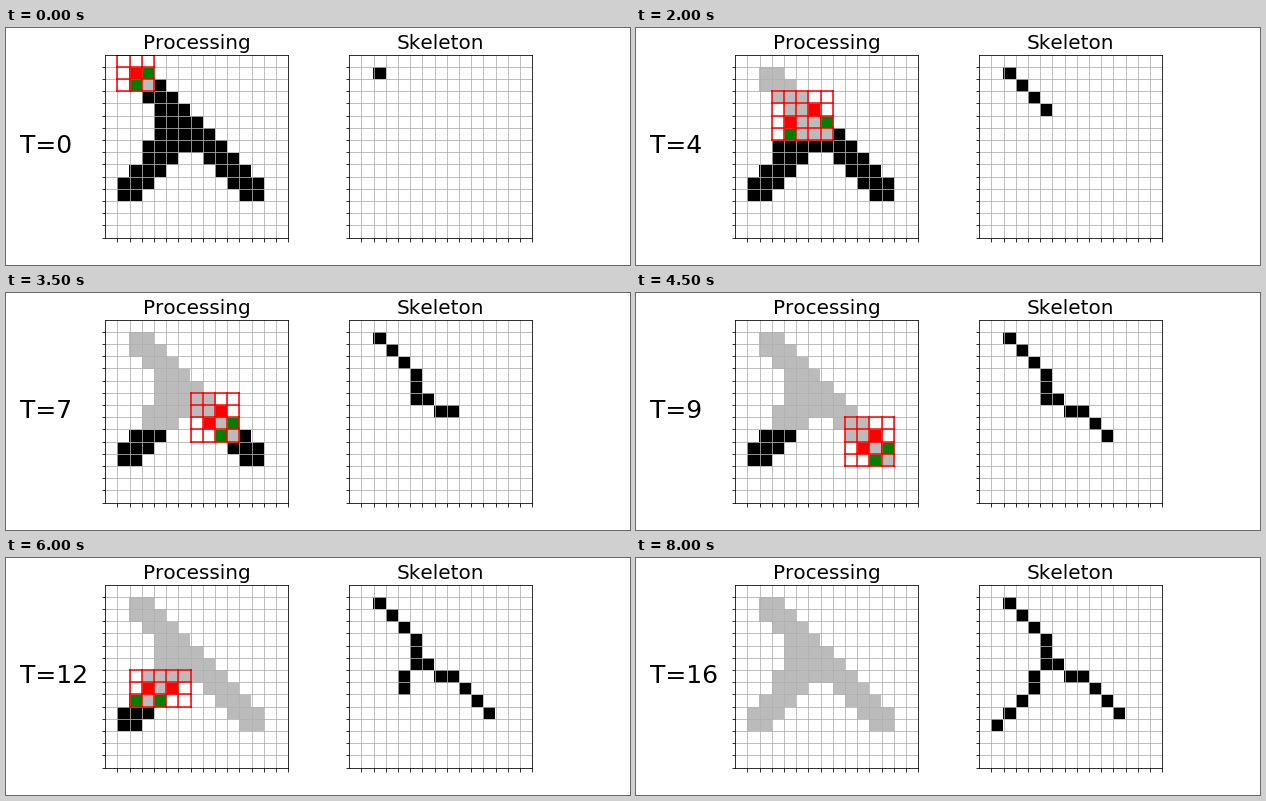
A matplotlib script that plays this animation: 624x237 px, repeating every 8.5 s.

```python
import numpy as np
import matplotlib.pyplot as plt
from matplotlib.animation import FuncAnimation
from matplotlib.colors import ListedColormap

W, H, DPI = 624, 237, 72
N, CELL = 15, 12.2
STEPS = 17
SPLIT, LAST = 7, 11   # last row above the split, last filled row
FORK = SPLIT - 1      # step at which the shape splits in two
RESUME = LAST + 1     # step at which the stored branch is picked up

WHITE, BLACK, GRAY, RED, GREEN, BLUE = range(6)
CMAP = ListedColormap(["white", "black", "#bbbbbb", "red", "green", "blue"])

plt.rcParams["text.kerning_factor"] = 6


def main_row(r):
    """First and last column of the trunk and the right arm."""
    first = r if r > SPLIT else min(max(2, r), 4, 10 - r)
    return first, min(r + 2, 12)


def branch_row(r):
    """First and last column of the left arm."""
    return max(1, 11 - r), 13 - r


def front(step):
    """Contour cells (column, row) visited at a step."""
    if step == 0:
        return [(main_row(1)[0], 1)]
    if step < LAST:
        return [(main_row(step)[1], step), (main_row(step + 1)[0], step + 1)]
    row = step - RESUME + SPLIT + 1
    if SPLIT < row <= LAST:
        return [(c, row) for c in branch_row(row)]
    return []


def window(cells):
    """Bounding box of the 3x3 neighbourhoods: c0, c1, r0, r1."""
    cols, rows = zip(*cells)
    return min(cols) - 1, max(cols) + 2, min(rows) - 1, max(rows) + 2


def paint(grid, cells, value):
    for c, r in cells:
        grid[r, c] = value


def processing(step):
    grid = np.full((N, N), WHITE)
    for r in range(1, LAST + 1):
        spans = [main_row(r)] + ([branch_row(r)] if r > SPLIT else [])
        for a, b in spans:
            grid[r, a:b + 1] = BLACK
    for t in range(step + 1):
        if front(t):
            c0, c1, r0, r1 = window(front(t))
            part = grid[r0:r1, c0:c1]
            part[part != WHITE] = GRAY
    if front(step):
        paint(grid, front(step), RED)
        paint(grid, front(step + 1), GREEN)
    if step == FORK:
        paint(grid, front(RESUME), BLUE)
    return grid


def middle(step):
    return np.mean(front(step), axis=0).astype(int)


def skeleton(step):
    """Midpoints of the visited fronts, joined by straight runs of cells."""
    grid = np.full((N, N), WHITE)
    last = middle(0)
    for t in range(step + 1):
        if not front(t):
            continue
        if t == RESUME:
            last = middle(FORK)
        here = middle(t)
        count = max(abs(here - last)) + 1
        paint(grid, np.rint(np.linspace(last, here, count)).astype(int), BLACK)
        last = here
    return grid


def mesh(step):
    """Line path of the red window, with gaps between the strokes."""
    if not front(step):
        return [], []
    c0, c1, r0, r1 = window(front(step))
    xs, ys = [], []
    for c in range(c0, c1 + 1):
        xs += [c, c, np.nan]
        ys += [r0, r1, np.nan]
    for r in range(r0, r1 + 1):
        xs += [c0, c1, np.nan]
        ys += [r, r, np.nan]
    return xs, ys


def make_panel(left, title):
    top, side = 26.6, N * CELL
    ax = fig.add_axes([left / W, 1 - (top + side) / H, side / W, side / H])
    image = ax.imshow(np.zeros((N, N)), cmap=CMAP, vmin=WHITE, vmax=BLUE,
                      extent=(0, N, N, 0), interpolation="nearest",
                      aspect="auto")
    ax.set_xticks(range(1, N + 1))
    ax.set_yticks(range(1, N + 1))
    ax.tick_params(labelbottom=False, labelleft=False)
    ax.grid(True)
    ax.set_title(title, fontsize=20)
    return ax, image


fig = plt.figure(figsize=(W / DPI, H / DPI), dpi=DPI, facecolor="white")
left_ax, left_image = make_panel(99.25, "Processing")
right_ax, right_image = make_panel(343.25, "Skeleton")
outline, = left_ax.plot([], [], color="red", lw=1.5, snap=True,
                        scalex=False, scaley=False)
label = fig.text(14 / W, 1 - 125 / H, "", fontsize=25, va="baseline")


def draw(step):
    left_image.set_data(processing(step))
    right_image.set_data(skeleton(step))
    outline.set_data(*mesh(step))
    label.set_text(f"T={step}")
    return left_image, right_image, outline, label


anim = FuncAnimation(fig, draw, frames=STEPS, interval=500, repeat=True)
plt.show()
```
